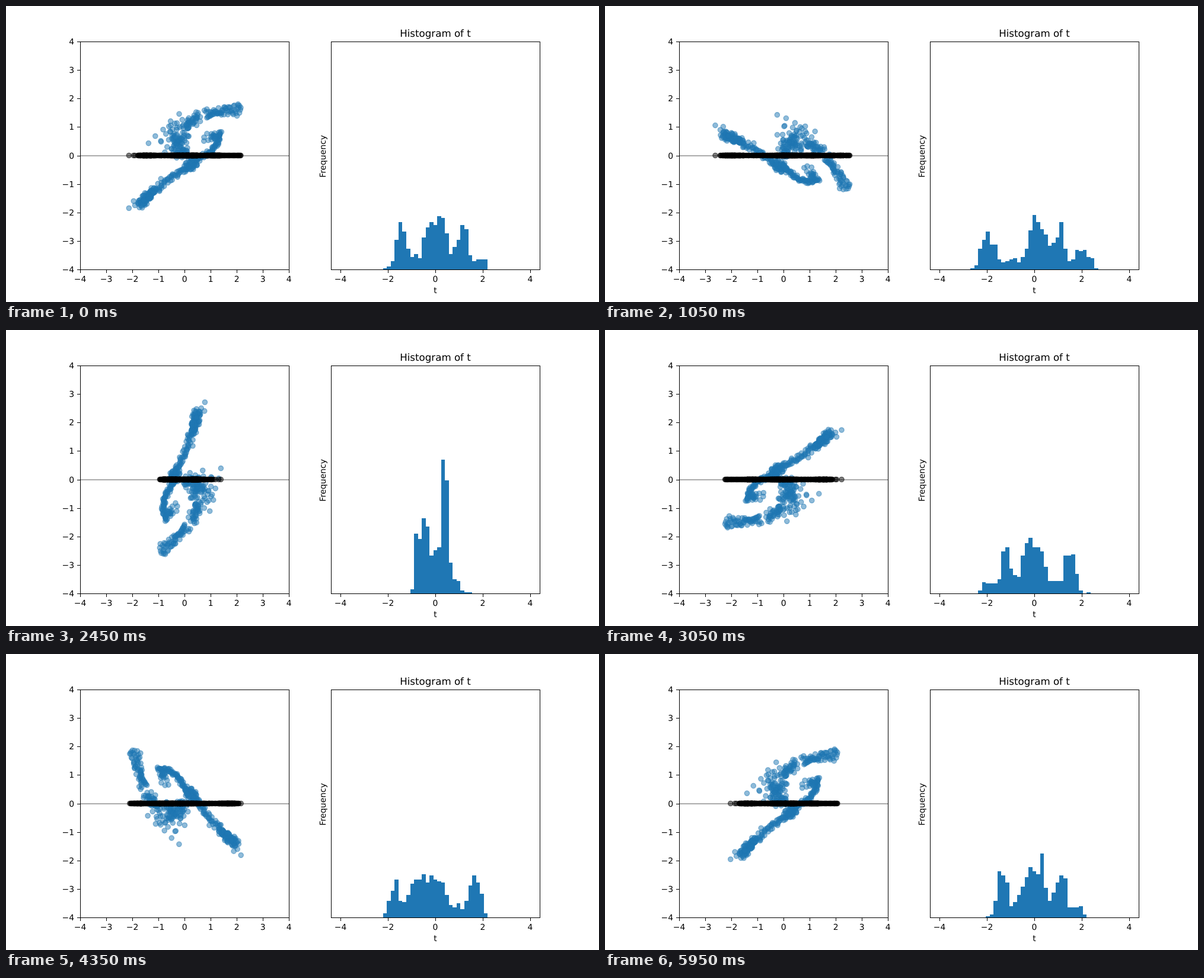
Animation, 1000 px wide and 500 px high, one loop 6 s. Source, as an HTML page with a canvas:

```html
<!DOCTYPE html>
<html lang="en">
<head>
<meta charset="utf-8">
<title>Rotating projection</title>
<style>
  html, body { margin: 0; width: 100%; height: 100%; overflow: hidden; background: #fff; }
  canvas { display: block; }
</style>
</head>
<body>
<canvas id="stage" width="1000" height="500"></canvas>
<script>
const ctx = document.getElementById('stage').getContext('2d');
ctx.textRendering = 'geometricPrecision';

const BLUE = '#1f77b4';
const FONT = '"DejaVu Sans", sans-serif';
const LOOP = 6000, STEPS = 120;
const BINS = 49, BIN_WIDTH = 8 / BINS;
const BASE_Y = 445;

const plotX = x => 301.1 + x * 44.03;
const plotY = y => 252.5 - y * 48.125;
const histX = t => 724 + t * 40;

let seed = 20;
function random() {
  seed = (seed + 0x6D2B79F5) | 0;
  let r = Math.imul(seed ^ (seed >>> 15), 1 | seed);
  r = (r + Math.imul(r ^ (r >>> 7), 61 | r)) ^ r;
  return ((r ^ (r >>> 14)) >>> 0) / 4294967296;
}
// Bell-shaped, deviation 1, never beyond 3
const bell = () => 2 * (random() + random() + random() - 1.5);

// A few strays; clusters and curves add the rest
const points = [[-2.13, -1.85], [-1.95, -1.6], [-1.9, -1.75], [-1.38, 0.43], [-1.12, 0.68], [2.05, 1.8]];

// Oval cloud whose long axis is tilted by the given degrees
function cluster(count, [x, y], degrees, long, wide) {
  const c = Math.cos(degrees * Math.PI / 180), s = Math.sin(degrees * Math.PI / 180);
  for (let i = 0; i < count; i++) {
    const a = bell() * long, b = bell() * wide;
    points.push([x + a * c - b * s, y + a * s + b * c]);
  }
}

// Quadratic curve with points scattered to both sides
function curve(count, [x0, y0], [x1, y1], [x2, y2], spread) {
  const mix = (a, b, c, f) => a * (1 - f) ** 2 + 2 * b * f * (1 - f) + c * f * f;
  const slope = (a, b, c, f) => (b - a) * (1 - f) + (c - b) * f;
  for (let i = 0; i < count; i++) {
    const f = (i + random()) / count;
    const dx = slope(x0, x1, x2, f), dy = slope(y0, y1, y2, f);
    const off = bell() * spread / Math.hypot(dx, dy);
    points.push([mix(x0, x1, x2, f) - dy * off, mix(y0, y1, y2, f) + dx * off]);
  }
}

// Tail, centre and hook
cluster(95, [-1.44, -1.48], 37, 0.21, 0.075);
curve(54, [-1.25, -1.3], [-0.6, -0.75], [0.15, -0.42], 0.06);
cluster(68, [0.31, -0.25], 38, 0.16, 0.09);
curve(58, [0.6, -0.08], [1.28, 0.2], [1.4, 0.85], 0.035);
cluster(19, [1.05, 0.68], 0, 0.14, 0.09);
// Upper arc in two parts, the loose cloud and its link to the centre
curve(63, [0.8, 1.42], [1.4, 1.6], [2.18, 1.62], 0.09);
curve(38, [0, 1.02], [0.25, 1.24], [0.6, 1.36], 0.1);
cluster(66, [-0.33, 0.68], 60, 0.3, 0.26);
curve(33, [-0.35, 0.42], [-0.2, 0.15], [0.1, 0.03], 0.12);

function scatter(cloud, color) {
  ctx.globalAlpha = 0.5;
  ctx.fillStyle = ctx.strokeStyle = color;
  ctx.lineWidth = 1.3;
  for (const [x, y] of cloud) {
    ctx.beginPath();
    ctx.arc(plotX(x), plotY(y), 4.17, 0, 2 * Math.PI);
    ctx.fill();
    ctx.stroke();
  }
  ctx.globalAlpha = 1;
}

function histogram(values) {
  const counts = new Array(BINS).fill(0);
  for (const t of values) counts[Math.floor((t + 4) / BIN_WIDTH)]++;
  const scale = 192.5 / (values.length * BIN_WIDTH);
  const edge = k => Math.round(histX(-4 + k * BIN_WIDTH));
  ctx.fillStyle = BLUE;
  counts.forEach((count, k) => {
    const height = Math.round(count * scale);
    ctx.fillRect(edge(k), BASE_Y - height, edge(k + 1) - edge(k), height);
  });
}

function text(str, x, y, align = 'center', size = 13.89) {
  ctx.font = size + 'px ' + FONT;
  ctx.textAlign = align;
  ctx.fillText(str, x, y);
}

const label = n => String(n).replace('-', '\u2212');

function tickX(x, n) {
  ctx.fillRect(Math.round(x), 446, 1, 5);
  text(label(n), x, 466);
}

function tickY(y, n) {
  ctx.fillRect(120, Math.round(y), 5, 1);
  text(label(n), 115, Math.round(y) + 5, 'right');
}

function axes() {
  ctx.strokeStyle = ctx.fillStyle = '#000';
  ctx.lineWidth = 1;
  ctx.strokeRect(125.5, 60.5, 352, 385);
  ctx.strokeRect(548.5, 60.5, 352, 385);
  for (let n = -4; n <= 4; n++) {
    tickX(plotX(n), n);
    tickY(plotY(n), n);
    if (n % 2 === 0) tickX(histX(n), n);
  }
  text('Histogram of t', 724, 52, 'center', 16.67);
  text('t', 724, 485);
  ctx.save();
  ctx.translate(539, 254);
  ctx.rotate(-Math.PI / 2);
  text('Frequency', 0, 0);
  ctx.restore();
}

function draw(step) {
  const angle = step / STEPS * 2 * Math.PI;
  const c = Math.cos(angle), s = Math.sin(angle);
  const turned = points.map(([x, y]) => [x * c + y * s, y * c - x * s]);

  ctx.fillStyle = '#fff';
  ctx.fillRect(0, 0, 1000, 500);
  scatter(turned, BLUE);
  ctx.fillStyle = 'rgba(0, 0, 0, 0.33)';
  ctx.fillRect(126, 252, 351, 2);
  scatter(turned.map(([x]) => [x, 0]), '#000');
  histogram(turned.map(([x]) => x));
  axes();
}

const start = performance.now();
let shown = -1;
function tick() {
  const step = Math.floor((performance.now() - start) % LOOP / LOOP * STEPS);
  if (step !== shown) draw(shown = step);
  requestAnimationFrame(tick);
}
tick();
</script>
</body>
</html>
```
